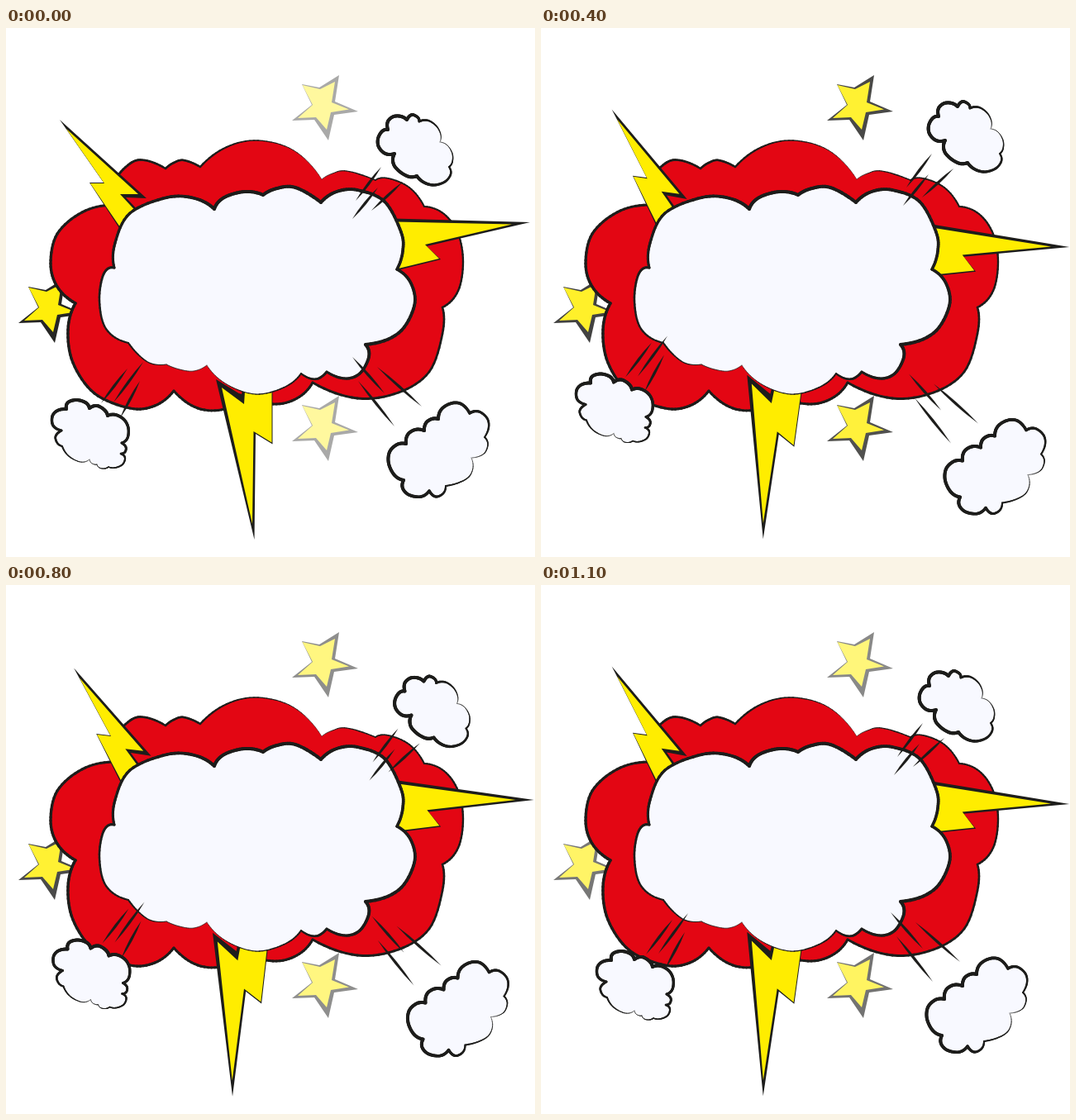
Animation, 640 px wide and 640 px high, one loop 1.2 s. Source, as an HTML page with a canvas:

```html
<!DOCTYPE html>
<html lang="en">
<head>
<meta charset="utf-8">
<title>Comic burst</title>
<style>
html, body { margin: 0; width: 100%; height: 100%; overflow: hidden; background: #fff; }
canvas { display: block; }
</style>
</head>
<body>
<canvas id="stage" width="640" height="640"></canvas>
<script>
const ctx = document.getElementById('stage').getContext('2d');
const INK = [29, 29, 27], YELLOW = [255, 237, 0];
const RED = '#e30613', PALE = '#f8f9ff';
const STEP = 100, STEPS = 12;

const lerp = (a, b, k) => a + (b - a) * k;
const tint = (c, k) => `rgb(${c.map(v => Math.round(lerp(255, v, k)))})`;

// Each bump is [end width, x, y, x, y, ...] and continues from the previous one.
const redCloud = outline([
  [2.5, 130, 187, 150, 164, 168, 160, 193, 170],
  [2.5, 203, 163, 215, 160, 235, 168],
  [0.4, 267, 144, 305, 136, 348, 148, 382, 183],
  [1.5, 395, 176, 412, 173, 447, 184],
  [2, 463, 182, 488, 193, 506, 216],
  [2.5, 530, 225, 547, 249, 553, 283, 547, 318, 528, 338],
  [3, 528, 370, 512, 416, 475, 441, 425, 448, 371, 429],
  [3, 352, 448, 323, 455, 283, 444],
  [3, 264, 461, 232, 460, 203, 439],
  [3.5, 180, 457, 150, 460, 107, 442, 81, 405, 75, 365, 84, 333],
  [3, 62, 313, 54, 285, 62, 249, 92, 223, 129, 214]
]);

const paleCloud = outline([
  [4, 132, 260, 150, 224, 195, 205, 228, 206, 252, 219],
  [4, 264, 205, 289, 198, 311, 202],
  [4, 328, 194, 350, 193, 381, 211],
  [3.5, 400, 198, 425, 196, 458, 210, 478, 247, 480, 270, 473, 292],
  [4, 490, 309, 494, 336, 475, 369, 435, 383],
  [3, 439, 398, 428, 418, 410, 424, 388, 416],
  [2, 378, 424, 368, 424, 357, 418],
  [0.5, 336, 435, 302, 443, 267, 431, 243, 408],
  [0.8, 227, 415, 210, 413, 194, 407],
  [2, 176, 406, 162, 397, 148, 381],
  [3, 121, 364, 113, 330, 118, 298, 131, 290]
]);

// Small puffs with their speed lines; path holds an offset for each key pose.
const puffs = [
  {
    shape: outline([
      [4, 459, 152, 451, 144, 450, 134, 455, 125, 462, 123],
      [4, 462, 113, 469, 107, 478, 107, 485, 111],
      [3, 491, 105, 498, 108, 500, 113],
      [0.4, 511, 112, 521, 119, 526, 129, 525, 138],
      [2, 534, 142, 540, 152, 540, 162, 536, 168],
      [4, 538, 177, 531, 186, 518, 190, 506, 187, 497, 179],
      [4, 488, 180, 478, 175, 470, 167, 468, 159, 470, 152]
    ]),
    lines: [[454, 168, 423, 209], [480, 186, 442, 221], [450, 193, 419, 231]],
    path: [[0, 0], [-3, -8], [11, -21], [27, -11], [25, 8], [16, 3], [8, -1]]
  },
  {
    shape: outline([
      [4, 57, 481, 56, 470, 62, 463, 73, 461],
      [4, 75, 453, 85, 450, 96, 453, 101, 460],
      [4, 110, 457, 119, 462, 123, 469],
      [3, 133, 468, 143, 474, 148, 484, 147, 496, 140, 502],
      [2.5, 145, 507, 144, 513, 139, 515],
      [1.5, 144, 520, 141, 528, 132, 532, 124, 531],
      [0.6, 119, 533, 113, 532, 110, 528],
      [0.4, 107, 528, 103, 526, 101, 522],
      [2, 90, 525, 76, 518, 68, 506],
      [3, 62, 502, 60, 494, 67, 487]
    ]),
    lines: [[147, 412, 115, 454], [166, 404, 130, 453], [162, 427, 138, 472]],
    path: [[0, 0], [-14, 3], [-22, -24], [-4, -39], [-2, -27], [5, -14], [12, -7]]
  },
  {
    shape: outline([
      [4, 470, 541, 463, 527, 464, 513, 473, 504, 484, 503],
      [4, 486, 492, 495, 486, 506, 487],
      [4, 508, 478, 515, 473, 523, 473],
      [3.5, 527, 461, 539, 454, 551, 455, 561, 466],
      [2, 572, 464, 582, 472, 584, 483, 579, 495],
      [0.4, 583, 503, 580, 513, 573, 518, 563, 520],
      [2, 565, 532, 560, 543, 548, 550, 532, 554],
      [3.5, 529, 563, 520, 567, 512, 560],
      [4, 502, 567, 488, 565, 480, 557, 481, 547]
    ]),
    lines: [[419, 398, 458, 442], [449, 410, 503, 458], [426, 427, 470, 482]],
    path: [[0, 0], [0, 11], [17, 26], [35, 15], [32, -2], [15, 7], [4, -2]]
  }
];

const bolts = [
  {
    pivot: [166, 255],
    ink: [65, 111, 170, 206, 145, 205, 178, 240, 150, 262, 101, 187, 118, 187],
    fill: [73, 122, 160, 201, 138, 201, 174, 240, 151, 260, 102, 188, 119, 188]
  },
  {
    pivot: [418, 288],
    ink: [450, 230, 634, 235, 509, 264, 526, 280, 450, 299],
    fill: [450, 234, 612, 237.5, 507, 262, 524, 279, 450, 297]
  },
  {
    pivot: [290, 388],
    ink: [254, 425, 285, 444, 287, 425, 322.5, 425, 322.5, 503.5, 302, 491, 300.5, 619],
    fill: [261, 435, 288, 455, 290, 425, 321.5, 425, 321.5, 501.5, 299.5, 488, 298, 600]
  }
];

const starInk = [358, 68, 379, 72, 403, 57, 398, 89, 426, 101, 397, 105, 390, 136, 373, 111, 346, 112, 370, 93];
const starFill = [358.5, 69, 380, 74, 398, 65, 394, 90, 415, 98.5, 393, 102, 388, 123, 375, 108, 353, 109, 371, 93];
const stars = [
  { at: [0, 0], glow: [0.38, 0.77, 0.7, 0.91, 0.3, 0.7, 0.52] },
  { at: [-331, 245], glow: [0.96, 0.7, 1, 0.67, 0.6, 1, 0.6] },
  { at: [0, 388], glow: [0.38, 0.79, 0.7, 0.84, 0.44, 0.56, 0.62] }
];

const keys = [0, 1, 3, 5, 7, 9, 11];
const swing = [0, 1, 0.5, 1, 0.75, 0.5, 0.75];
const SWING = 10.5 * Math.PI / 180;

function spline(a, b, c, d, k) {
  return 0.5 * (2 * b + (c - a) * k + (2 * a - 5 * b + 4 * c - d) * k * k + (3 * b - a - 3 * c + d) * k * k * k);
}

// Smooth each bump, keep the corners between bumps; gives [x, y, width] points.
function outline(bumps) {
  const last = bumps[bumps.length - 1];
  let from = last.slice(-2), w0 = last[0];
  const out = [[...from, w0]];
  for (const [w1, ...xy] of bumps) {
    const p = [from];
    for (let i = 0; i < xy.length; i += 2) p.push([xy[i], xy[i + 1]]);
    const n = p.length - 1;
    const beyond = (a, b, c) => a.map((v, i) => 3 * v - 3 * b[i] + c[i]);
    const q = [beyond(p[0], p[1], p[2]), ...p, beyond(p[n], p[n - 1], p[n - 2])];
    for (let i = 0; i < n; i++) {
      for (let s = 1; s <= 8; s++) {
        const at = j => spline(q[i][j], q[i + 1][j], q[i + 2][j], q[i + 3][j], s / 8);
        out.push([at(0), at(1), lerp(w0, w1, (i + s / 8) / n)]);
      }
    }
    from = p[n];
    w0 = w1;
  }
  return out;
}

function drawCloud(points, color) {
  ctx.fillStyle = color;
  ctx.beginPath();
  for (const [x, y] of points) ctx.lineTo(x, y);
  ctx.fill();
  ctx.strokeStyle = tint(INK, 1);
  ctx.lineCap = 'round';
  for (let i = 1; i < points.length; i++) {
    const [x, y, w] = points[i];
    ctx.lineWidth = w;
    ctx.beginPath();
    ctx.moveTo(points[i - 1][0], points[i - 1][1]);
    ctx.lineTo(x, y);
    ctx.stroke();
  }
}

function polygon(xy, color) {
  ctx.fillStyle = color;
  ctx.beginPath();
  for (let i = 0; i < xy.length; i += 2) ctx.lineTo(xy[i], xy[i + 1]);
  ctx.fill();
}

function spindle([x0, y0, x1, y1]) {
  const len = Math.hypot(x1 - x0, y1 - y0);
  const nx = (y0 - y1) / len * 3.4, ny = (x1 - x0) / len * 3.4;
  const mx = (x0 + x1) / 2, my = (y0 + y1) / 2;
  ctx.fillStyle = tint(INK, 1);
  ctx.beginPath();
  ctx.moveTo(x0, y0);
  ctx.quadraticCurveTo(mx + nx, my + ny, x1, y1);
  ctx.quadraticCurveTo(mx - nx, my - ny, x0, y0);
  ctx.fill();
}

function at(x, y, paint) {
  ctx.save();
  ctx.translate(x, y);
  paint();
  ctx.restore();
}

function draw(step) {
  let i = keys.length - 1;
  while (keys[i] > step) i--;
  const j = (i + 1) % keys.length;
  const k = (step - keys[i]) / ((keys[j] || STEPS) - keys[i]);
  const pose = list => lerp(list[i], list[j], k);

  ctx.fillStyle = '#fff';
  ctx.fillRect(0, 0, 640, 640);

  for (const s of stars) {
    const glow = pose(s.glow);
    at(...s.at, () => {
      polygon(starInk, tint(INK, glow));
      polygon(starFill, tint(YELLOW, glow));
    });
  }

  drawCloud(redCloud, RED);

  for (const b of bolts) {
    const [px, py] = b.pivot;
    at(px, py, () => {
      ctx.rotate(pose(swing) * SWING);
      ctx.translate(-px, -py);
      polygon(b.ink, tint(INK, 1));
      polygon(b.fill, tint(YELLOW, 1));
    });
  }

  drawCloud(paleCloud, PALE);

  for (const p of puffs) {
    const [a, b] = [p.path[i], p.path[j]];
    at(lerp(a[0], b[0], k), lerp(a[1], b[1], k), () => {
      drawCloud(p.shape, PALE);
      p.lines.forEach(spindle);
    });
  }
}

const start = performance.now();
let shown = -1;
function tick() {
  const step = Math.floor((performance.now() - start) / STEP) % STEPS;
  if (step !== shown) draw(shown = step);
  requestAnimationFrame(tick);
}
tick();
</script>
</body>
</html>
```
